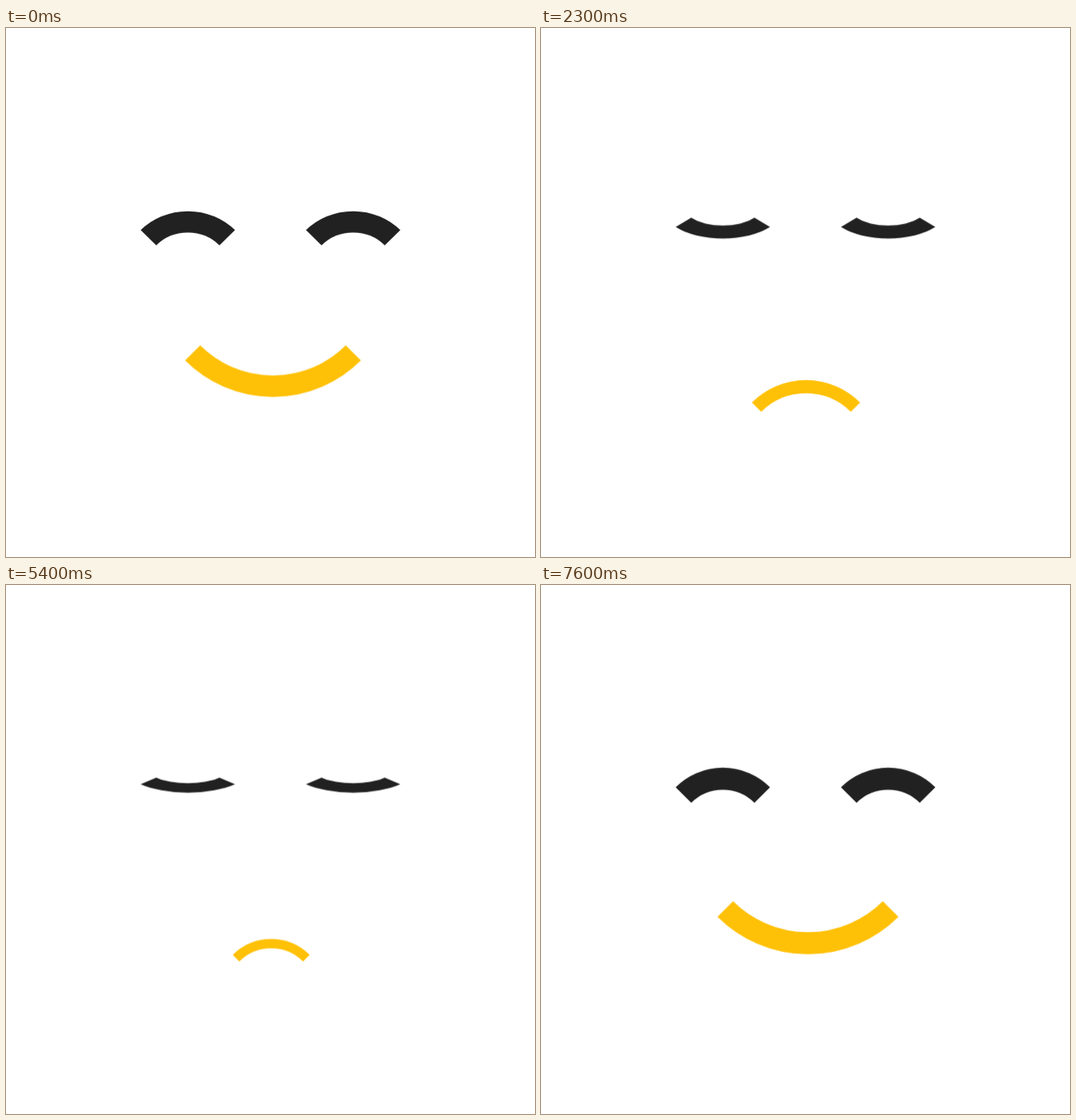
These frames come from a looping animation (640x640 px, 9200 ms). An HTML page:

```html
<!DOCTYPE html>
<html lang="en">
<head>
<meta charset="utf-8">
<title>Smile and frown</title>
<style>
  html, body { margin: 0; width: 100%; height: 100%; overflow: hidden; background: #fff; }
  svg { display: block; width: 100%; height: 100%; }
  path { fill: none; stroke-width: 26.67; }
  .eye { stroke: #212121; animation: blink 9.2s infinite step-end; }
  .mouth { stroke: #ffc107; animation: turn 9.2s infinite step-end; }

  /* Linear flips drawn at ten steps a second, with a hold after each */
  @keyframes blink {
    0% { transform: scaleY(.972); animation-timing-function: steps(29); }
    31.52% { transform: scaleY(-1.008); }
    31.521% { transform: scaleY(-1); }
    50% { transform: scaleY(-.947); animation-timing-function: steps(30); }
    82.607% { transform: scaleY(1.009); }
    82.608%, 100% { transform: scaleY(1); }
  }
  @keyframes turn {
    0% { transform: scale(.972); animation-timing-function: steps(29); }
    31.52% { transform: scale(-1.008); }
    31.521% { transform: scale(-1); }
    50% { transform: scale(-.947); animation-timing-function: steps(30); }
    82.607% { transform: scale(1.009); }
    82.608%, 100% { transform: scale(1); }
  }
</style>
</head>
<body>
<svg viewBox="0 0 640 640">
  <g transform="translate(220 242.2)">
    <path class="eye" d="M-47.65 11.85A67.4 67.4 0 0 1 47.65 11.85"/>
  </g>
  <g transform="translate(420 242.2)">
    <path class="eye" d="M-47.65 11.85A67.4 67.4 0 0 1 47.65 11.85"/>
  </g>
  <g transform="translate(321.5 433.7)">
    <path class="mouth" d="M-98.5 -41.8A141.4 141.4 0 0 0 101.5 -41.8"/>
  </g>
</svg>
</body>
</html>
```
